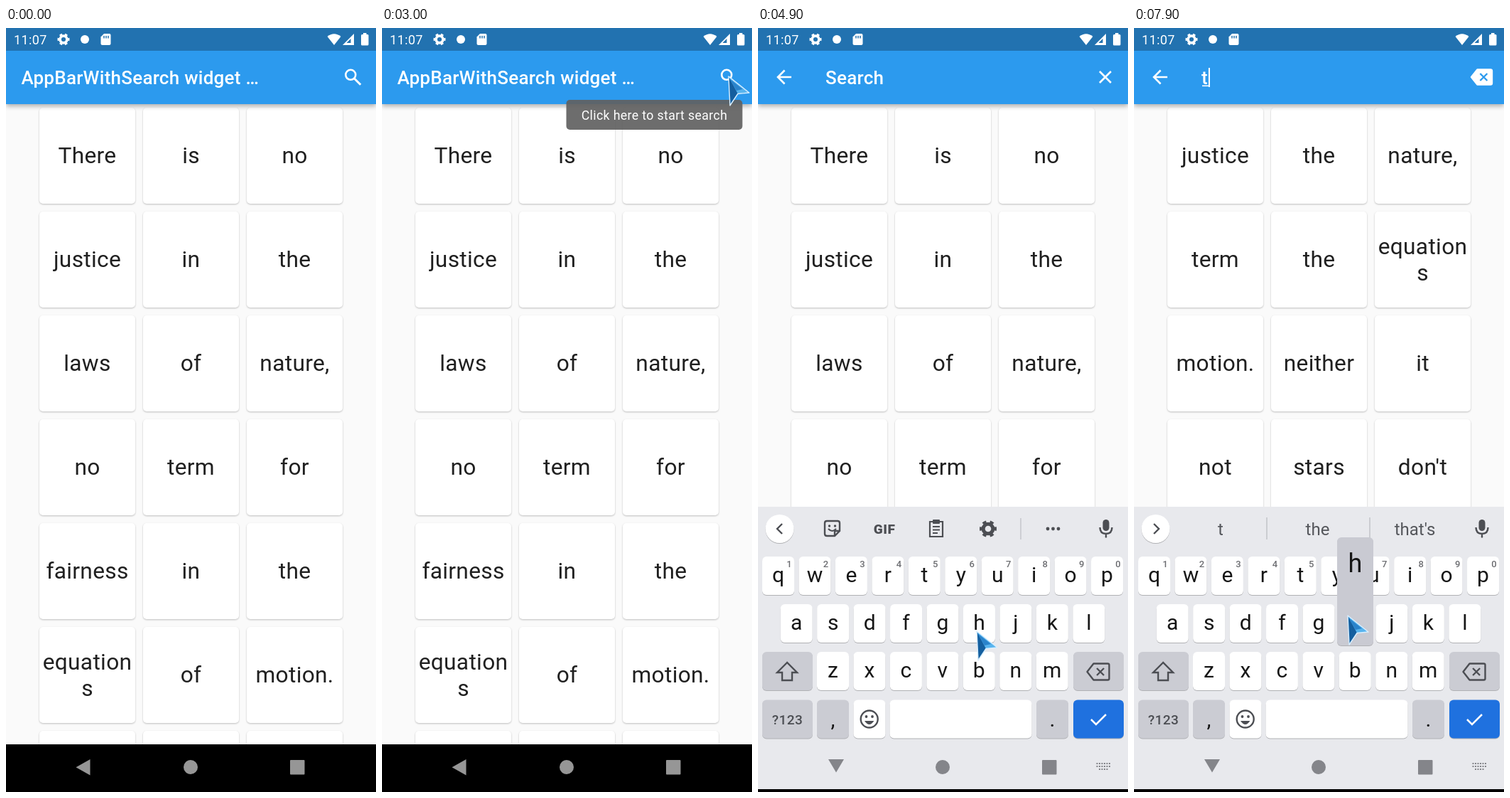
These frames come from a looping animation (521 px wide and 1074 px high, 8 s). An HTML page:

```html
<!DOCTYPE html>
<html lang="en">
<head>
<meta charset="utf-8">
<title>App bar with search</title>
<style>
  html, body { margin: 0; width: 100%; height: 100%; overflow: hidden; background: #fafafa; }
  svg { display: block; width: 521px; height: 1074px; font-family: Roboto, sans-serif; }
  .mid { text-anchor: middle; }
  .cards rect { fill: #fff; filter: drop-shadow(0 1.3px 1px rgba(0,0,0,.24)); }
  .cards text { font-size: 31.7px; letter-spacing: .317px; fill: #202020; }
  .bar { filter: drop-shadow(0 3px 3px rgba(0,0,0,.3)); }
  .title { font-size: 26px; font-weight: 500; letter-spacing: .25px; fill: #fff; }
  .key { filter: drop-shadow(0 1.2px .5px rgba(0,0,0,.24)); }
  .letter { font-size: 30px; fill: #161616; }
  .digit { font-size: 13px; font-weight: 500; fill: #6d6e72; }
  .suggest text { font-size: 24px; fill: #55575c; }
  .line { fill: none; stroke-width: 2.5; }
</style>
</head>
<body>
<svg id="stage" viewBox="0 0 521 1074" xmlns="http://www.w3.org/2000/svg"></svg>
<script>
const LOOP = 8000, STEP = 100;
const INK = '#4c4e53';

const rect = (x, y, w, h, fill, r = 0, extra = '') =>
  `<rect x="${x}" y="${y}" width="${w}" height="${h}" rx="${r}" fill="${fill}" ${extra}/>`;
const circle = (x, y, r, fill, extra = '') =>
  `<circle cx="${x}" cy="${y}" r="${r}" fill="${fill}" ${extra}/>`;
const path = (d, fill, extra = '') => `<path d="${d}" fill="${fill}" ${extra}/>`;
const line = (d, color, width = 2.5) =>
  `<path class="line" d="${d}" stroke="${color}" style="stroke-width:${width}"/>`;
const text = (x, y, s, cls = '', extra = '') => `<text x="${x}" y="${y}" class="${cls}" ${extra}>${s}</text>`;
const group = (id, body, extra = '') => `<g id="${id}" ${extra}>${body}</g>`;

const gear = (x, y, r, color) =>
  circle(x, y, r * .57, 'none', `stroke="${color}" stroke-width="${r * .42}"`) +
  circle(x, y, r * .84, 'none', `stroke="${color}" stroke-width="${r * .32}" pathLength="12" stroke-dasharray="1" stroke-dashoffset=".5"`);

function statusBar() {
  return rect(0, 0, 521, 32, '#2272b0') +
    text(11, 22.5, '11:07', '', 'font-size="18" letter-spacing=".4" fill="#fff"') +
    gear(81, 16, 8.5, '#fff') +
    circle(111, 16, 6, '#fff') +
    path('M138 8h7.500q2 0 2 2v12q0 2-2 2h-10q-2 0-2-2V12.500z', '#fff') +
    line('M138 11v3.500M141 11v3.500M144 11v3.500', '#2272b0', 1.5) +
    path('M452.500 12Q462 4.500 471.500 12L462 24z', '#fff') +
    path('M490 8v16h-16z', '#fff') + path('M485.500 15v6h-6z', '#2272b0') +
    rect(500, 9, 10.5, 15.500, '#fff', 1.5) + rect(503, 7, 4.500, 3, '#fff');
}

const backspace = (x, y, w, h, fill, stroke, cross) => {
  const l = x - w / 2, t = y - h / 2, n = w * .29, cx = x + w * .1;
  return path(`M${l + n} ${t}H${l + w - 2}q2 0 2 2v${h - 4}q0 2-2 2H${l + n}L${l} ${y}z`, fill,
      `stroke="${stroke}" stroke-width="2.4" stroke-linejoin="round"`) +
    line(`M${cx - 5} ${y - 5}l10 10m0-10l-10 10`, cross, 2.4);
};

function appBar() {
  return rect(0, 32, 521, 75, '#2c9aee', 0, 'class="bar"') +
    group('home', text(21.5, 79, 'AppBarWithSearch widget …', 'title') +
      circle(485.300, 65.800, 7, 'none', 'stroke="#fff" stroke-width="2.6"') +
      line('M490.500 71l8.800 8.800', '#fff', 3)) +
    group('search',
      line('M47 69H28.500M37.500 59.500l-9.500 9.500l9.500 9.500', '#fff', 2.6) +
      text(95, 78.500, '', 'title', 'id="field"') +
      rect(96, 80.500, 0, 1.600, '#fff', 0, 'id="underline"') +
      rect(96, 56, 2, 27, '#fff', 0, 'id="caret"') +
      group('close', line('M481 61l16 16m0-16l-16 16', '#fff', 2.600)) +
      group('clear', backspace(489.500, 69, 29, 21, '#fff', '#fff', '#2c9aee'))) +
    circle(488, 69, 45, '#fff', 'id="ripple" clip-path="url(#barClip)"');
}

function androidNav() {
  return rect(0, 1007, 521, 67, '#000') +
    path('M118.500 1028v22.500l-20-11.250z', '#969696') +
    circle(260, 1039, 10, '#969696') + rect(400, 1029, 20.500, 20.500, '#969696', 1);
}

const KEY_STEP = 51.45, KEY_W = 45;
const rows = [['qwertyuiop', 6, 743], ['asdfghjkl', 31.700, 810], ['zxcvbnm', 83, 877]];

const key = (x, y, w, fill = '#fff') => rect(x, y, w, 54, fill, 6, 'class="key"');

function letterKeys() {
  return rows.map(([letters, x0, y]) => [...letters].map((c, i) => {
    const x = x0 + i * KEY_STEP;
    return key(x, y, KEY_W) + text(x + KEY_W / 2, y + 36, c, 'letter mid') +
      (y === 743 ? text(x + 38, y + 15, (i + 1) % 10, 'digit mid') : '');
  }).join('')).join('');
}

function specialKeys() {
  const grey = '#cbccd3';
  return key(6, 877, 71, grey) + key(444, 877, 71, grey) +
    rect(444, 877, 71, 54, '#000', 6, 'id="pressed" opacity=".1"') +
    line('M41 892l-14 14h7v11h14v-11h7z', INK, 2.4) +
    backspace(479, 905, 31, 23, 'none', INK, INK) +
    key(6, 944.500, 71, grey) + text(41.500, 979, '?123', 'mid', `font-size="19" font-weight="500" letter-spacing=".5" fill="${INK}"`) +
    key(83, 944.500, KEY_W, grey) + text(105.500, 982, ',', 'letter mid') +
    key(134.500, 944.500, KEY_W) +
    circle(156.700, 971.500, 12, 'none', `stroke="${INK}" stroke-width="2.4"`) +
    circle(152.500, 968, 1.900, INK) + circle(161, 968, 1.900, INK) +
    path('M150 974q6.700 10 13.400 0z', INK) +
    key(185.500, 944.500, 200) +
    key(392, 944.500, KEY_W, grey) + text(414.500, 982, '.', 'letter mid') +
    key(444, 944.500, 71, '#1f71df') + line('M469 972l7 7l14-14', '#fff', 2.5);
}

function toolbar() {
  return line('M113 693h-16q-3 0-3 3v15q0 3 3 3h11l7-7v-11q0-3-3-3M108 714v-7h7', INK, 2.4) +
    circle(100.500, 700, 1.700, INK) + circle(108.500, 700, 1.700, INK) +
    line('M99 704q5.500 6 11 0', INK, 2.200) +
    text(178, 710.500, 'GIF', 'mid', `font-size="19" font-weight="900" letter-spacing=".5" fill="${INK}"`) +
    line('M242 694h18v21h-18zM246 701h10M246 705.500h10M246 710h7', INK, 2.2) + rect(246, 691, 10, 6, INK, 1) +
    gear(324, 704, 12, INK) +
    line('M370 689v30', '#c3c4c9', 1.4) +
    [408, 415.500, 423].map(x => circle(x, 704, 2.4, INK)).join('');
}

function keyboard() {
  const nav = '#84858a';
  const dots = [0, 1, 2].flatMap(r => [0, 1, 2, 3, 4, 5].map(c =>
    r === 2 && (c < 1 || c > 4) ? '' : rect(476.500 + c * 3.500, 1033 + r * 4, 2, 2, nav))).join('');
  return rect(0, 673, 521, 397, '#e8e9ed') + rect(0, 1070, 521, 4, '#000') +
    circle(30.500, 704, 20, '#fff', 'class="key"') +
    group('tools', toolbar() + line('M34 697l-7 7l7 7', INK, 2.400)) +
    group('suggest', line('M28 697l7 7l-7 7', INK, 2.400) +
      line('M187 688v31M332 688v31', '#bfc0c5', 1.4) +
      [122, 258.500, 395.500].map(x => text(x, 713, '', 'mid word')).join(''), 'class="suggest"') +
    rect(485.500, 691, 9, 16, INK, 4.500) + line('M481.500 702q0 9 8.500 9t8.500-9M490 711v5.500', INK, 2.4) +
    letterKeys() + specialKeys() +
    path('M99 1028h22l-11 18.500z', nav) + circle(260, 1039, 10, nav) + rect(400, 1029, 20.500, 20.500, nav, 1) + dots;
}

const cardText = (x, y, word) => word === 'equations'
  ? text(x, y - 18.500, 'equation', 'mid') + text(x, y + 18.500, 's', 'mid')
  : text(x, y, word, 'mid');

const cards = Array.from({ length: 21 }, (_, i) =>
  rect(47 + i % 3 * 146, 112 + Math.floor(i / 3) * 146, 135, 135, '#fff', 5)).join('');

const tooltip = rect(259.500, 101, 248, 42, '#616161', 5, 'opacity=".92"') +
  text(383.500, 128.500, 'Click here to start search', 'mid', 'font-size="17.75" letter-spacing=".36" fill="#fff"');

const pointer = path('M0 0L29 23L13 24.500L2 41z', '#58b4ee') +
  path('M0 0L13 24.500L2 41z', '#145f9f') + path('M1 3L20 18L11 20z', '#2a83cb') +
  path('M0 0L29 23L13 24.500L2 41z', 'none', 'stroke="#d9efff" stroke-width="1.4" stroke-linejoin="round"');

const stage = document.getElementById('stage');
stage.innerHTML = `<defs><clipPath id="barClip">${rect(0, 32, 521, 75, '#000')}</clipPath></defs>` +
  rect(0, 0, 521, 1074, '#fafafa') +
  `<g class="cards">${cards}${group('words', '')}</g>` +
  appBar() + statusBar() + group('tip', tooltip) + androidNav() + group('keyboard', keyboard()) +
  group('popup', rect(-25.500, -94, 51, 152, '#c9cad2', 6, 'class="key"') + text(0, -45, '', 'mid', 'id="popupLetter" font-size="36" fill="#161616"')) +
  group('pointer', pointer);

const $ = id => document.getElementById(id);
const show = (id, on) => { $(id).style.display = on ? '' : 'none'; };

const fullList = 'There is no justice in the laws of nature, no term for fairness in the equations of motion.';
const hList = 'There the the The neither The the the they have There light';
const tList = "justice the nature, term the equations motion. neither it not stars don't";

// start, query, words, suggestions
const states = [
  [0, null, fullList],
  [3200, '', fullList],
  [5200, 'h', hList, ['h', 'he', 'hey']],
  [6100, '', fullList],
  [7450, 't', tList, ['t', 'the', "that's"]]
];
// start, end, letter, key centre
const presses = [
  [5000, 5200, 'h', 311, 810],
  [7200, 7400, 't', 234, 743],
  [7900, 8000, 'h', 311.500, 810]
];
// time, x, y of the pointer tip
const track = [
  [400, 530, 400], [1300, 488, 68], [3800, 488, 68], [4700, 308, 848], [5200, 308, 848],
  [5700, 478, 914], [6600, 478, 914], [7100, 230, 780], [7400, 230, 780], [7800, 301, 826], [8000, 301, 826]
];

const progress = (t, a, b) => Math.min(1, Math.max(0, (t - a) / (b - a)));
const smooth = p => p * p * (3 - 2 * p);

function pointerAt(t) {
  const i = Math.max(1, track.findIndex(k => t <= k[0]));
  const [t0, x0, y0] = track[i - 1], [t1, x1, y1] = track[i];
  const p = smooth(progress(t, t0, t1));
  return [x0 + (x1 - x0) * p, y0 + (y1 - y0) * p];
}

let current;
function applyState(state) {
  const [, query, words, suggestions] = state;
  current = state;
  $('words').innerHTML = words.split(' ').map((w, i) =>
    cardText(114.500 + i % 3 * 146, 190 + Math.floor(i / 3) * 146, w)).join('');
  show('home', query === null);
  show('search', query !== null);
  show('close', !query);
  show('clear', query);
  show('tools', !suggestions);
  show('suggest', suggestions);
  $('field').textContent = query || 'Search';
  const width = query ? $('field').getComputedTextLength() : 0;
  $('underline').setAttribute('width', width);
  $('caret').setAttribute('x', 96 + width);
  if (suggestions) document.querySelectorAll('.word').forEach((el, i) => { el.textContent = suggestions[i]; });
}

function render(t) {
  const state = states.filter(s => s[0] <= t).pop();
  if (state !== current) applyState(state);
  show('caret', (t - state[0]) % 1000 < 500);

  const second = t >= 3000;
  $('ripple').setAttribute('r', second ? 15 + 30 * progress(t, 3000, 3300) : 15 + 30 * progress(t, 1400, 1800));
  $('ripple').setAttribute('opacity', .23 * (second
    ? (t > 3000 && t < 3300)
    : (t >= 1500) * (1 - progress(t, 2200, 2500))));
  $('tip').setAttribute('opacity', t > 3000 ? 0 : progress(t, 1900, 2100));

  show('keyboard', t >= 3200);
  $('keyboard').setAttribute('transform', `translate(0 ${401 * (1 - progress(t, 3100, 3400)) ** 2})`);
  show('pressed', t >= 6000 && t < 6200);

  const press = presses.find(p => t >= p[0] && t < p[1]);
  show('popup', press);
  if (press) {
    $('popup').setAttribute('transform', `translate(${press[3]} ${press[4]})`);
    $('popupLetter').textContent = press[2];
  }

  show('pointer', t >= 500);
  $('pointer').setAttribute('transform', `translate(${pointerAt(t)})`);
}

const start = performance.now();
function tick() {
  const t = (performance.now() - start) % LOOP;
  render(Math.floor(t / STEP) * STEP);
  requestAnimationFrame(tick);
}
tick();
</script>
</body>
</html>
```
